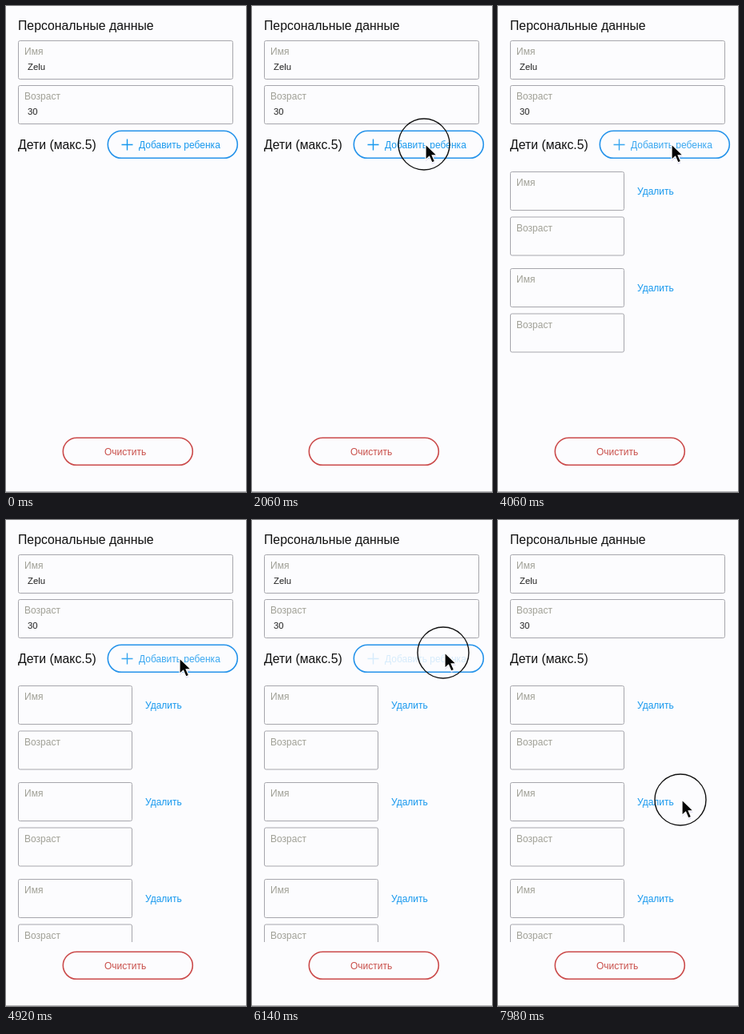
These frames come from a looping animation (300x608 px, 8 s). An HTML page:

```html
<!DOCTYPE html>
<html lang="ru">
<head>
<meta charset="utf-8">
<title>Персональные данные</title>
<style>
  html, body { margin: 0; width: 100%; height: 100%; overflow: hidden; background: #fcfcfe; }
  svg { display: block; width: 100vw; height: 100vh; }
  text { font: 12px "Liberation Sans", Arial, sans-serif; }
  .heading { font-size: 15.8px; fill: #111; }
  .value { font-size: 11.4px; fill: #222; }
  .label { fill: #a0a096; }
  .box { fill: none; stroke: #a6a6ac; }
  .pill { fill: none; stroke-width: 1.6; }
  .blue { fill: #1698ee; }
  .red { fill: #c9504b; }

  .child, .add, .ring { animation: 8s step-end infinite; }
  .first { animation-name: first; }
  .second { animation-name: second; }
  .third { animation-name: third; }
  .add { animation-name: add; }
  .ring { animation-name: ring; }
  .caption { animation: press 8s linear infinite; }
  .cursor { animation: travel 8s ease-in-out infinite; }

  @keyframes first { 0% { opacity: 0 } 28.5%, 100% { opacity: 1 } }
  @keyframes second { 0% { opacity: 0 } 45.5%, 100% { opacity: 1 } }
  @keyframes third { 0% { opacity: 0 } 55.75%, 100% { opacity: 1 } }
  @keyframes add { 0% { opacity: 1 } 81.25%, 100% { opacity: 0 } }
  @keyframes ring {
    0%, 28.5%, 45.5%, 55.75%, 68.5%, 81% { opacity: 0 }
    25.5%, 42.75%, 53%, 65.75%, 76%, 98.75%, 100% { opacity: 1 }
  }
  @keyframes press {
    0%, 25.75% { opacity: 1 }
    32%, 42.75%, 49%, 53%, 59%, 65.75%, 72%, 76% { opacity: .85 }
    26.75%, 28.5%, 43.75%, 45.5%, 54%, 55.75%, 66.75%, 68.5% { opacity: .2 }
    76.6%, 100% { opacity: .16 }
  }
  @keyframes travel {
    0%, 9.25% { transform: translate(310px, 620px) }
    23%, 62% { transform: translate(217px, 173px) }
    65.25%, 81% { transform: translate(241px, 166px) }
    85%, 91.25% { transform: translate(239px, 174px) }
    98%, 100% { transform: translate(230px, 350px) }
  }
</style>
</head>
<body>
<svg viewBox="0 0 300 608" preserveAspectRatio="none">
  <defs>
    <clipPath id="list"><rect y="195" width="300" height="333"/></clipPath>
    <g id="child">
      <rect class="box" x="15.5" y=".5" width="142" height="48" rx="2"/>
      <text class="label" x="23" y="18">Имя</text>
      <text class="blue" x="174" y="28.5">Удалить</text>
      <rect class="box" x="15.5" y="57" width="142" height="48" rx="2"/>
      <text class="label" x="23" y="75">Возраст</text>
    </g>
  </defs>
  <rect width="300" height="608" fill="#fcfcfe"/>
  <path d="M0 607.5H300" stroke="#b4b4b8"/>

  <text class="heading" x="15" y="29.5">Персональные данные</text>
  <rect class="box" x="15.5" y="43.5" width="268" height="48" rx="2"/>
  <text class="label" x="23" y="60.5">Имя</text>
  <text class="value" x="27" y="79.5">Zelu</text>
  <rect class="box" x="15.5" y="99.5" width="268" height="48" rx="2"/>
  <text class="label" x="23" y="117">Возраст</text>
  <text class="value" x="27" y="135.5">30</text>
  <text class="heading" x="15" y="179">Дети (макс.5)</text>

  <g class="add">
    <rect class="pill" x="127.3" y="156.3" width="162" height="34" rx="17" stroke="#2593ea"/>
    <g class="caption">
      <path d="M144.5 173.5h14m-7-7v14" stroke="#1698ee" stroke-width="1.4"/>
      <text class="blue" x="166" y="177.5">Добавить ребенка</text>
    </g>
  </g>

  <g clip-path="url(#list)">
    <use class="child first" href="#child" y="207"/>
    <use class="child second" href="#child" y="328"/>
    <use class="child third" href="#child" y="449"/>
  </g>

  <rect class="pill" x="71.3" y="540.3" width="162" height="34" rx="17" stroke="#cb4b4b"/>
  <text class="red" x="123" y="561.7">Очистить</text>

  <g class="cursor">
    <circle class="ring" cx="-2" r="32" fill="none" stroke="#111" stroke-width="1.4"/>
    <path d="M0 0V19.5L4.6 15.2L8 23L11.6 21.4L8.2 13.9H14.2Z" fill="#d9d6f2" opacity=".7" transform="translate(0 2)"/>
    <path d="M0 0V19.5L4.6 15.2L8 23L11.6 21.4L8.2 13.9H14.2Z" fill="#050505" stroke="#fff" stroke-width="1.2"/>
  </g>
</svg>
</body>
</html>
```
